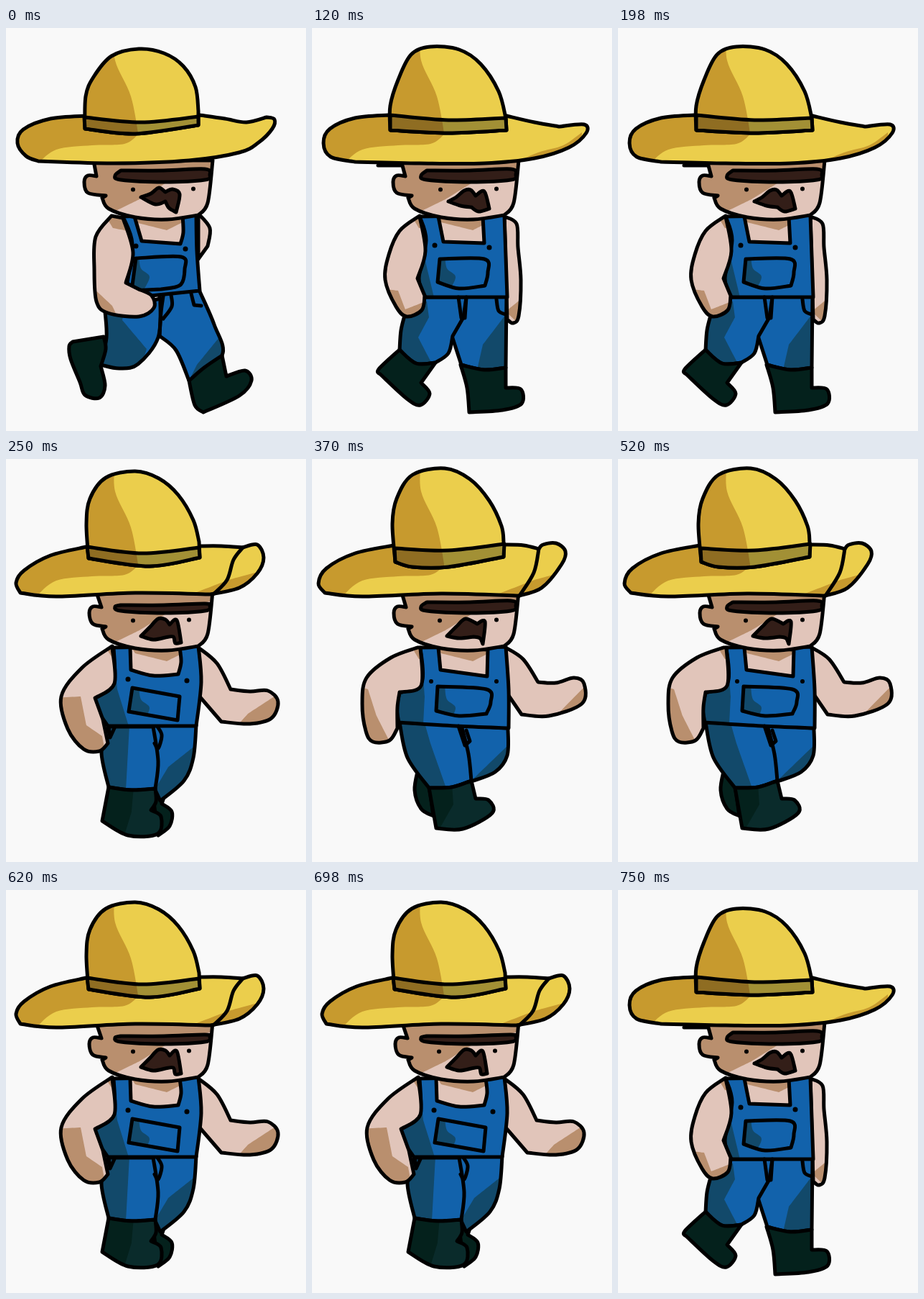
An HTML page with a canvas that plays this animation: 418x560 px, repeating every 0.87 s.

```html
<!DOCTYPE html>
<html lang="en">
<meta charset="utf-8">
<title>Walking farmer</title>
<style>
html, body { margin: 0; height: 100%; overflow: hidden; background: #f9f9f9 }
canvas { display: block }
</style>
<canvas width="418" height="560"></canvas>
<script>
const ctx = document.querySelector('canvas').getContext('2d');

// Smooth curve through the points; a slash makes the point before it a corner.
function trace(d) {
  const path = new Path2D();
  let last;
  for (const run of d.split('/')) {
    const n = run.trim().split(/\s+/).map(Number);
    const pts = last ? [last] : [];
    for (let i = 0; i < n.length; i += 2) pts.push([n[i], n[i + 1]]);
    if (!last) path.moveTo(...pts[0]);
    for (let i = 1; i < pts.length; i++) {
      const a = pts[i - 1], b = pts[i];
      const before = pts[i - 2] || a, after = pts[i + 1] || b;
      path.bezierCurveTo(
        a[0] + (b[0] - before[0]) / 6, a[1] + (b[1] - before[1]) / 6,
        b[0] - (after[0] - a[0]) / 6, b[1] - (after[1] - a[1]) / 6, ...b);
    }
    last = pts[pts.length - 1];
  }
  return path;
}

function line(d) {
  ctx.stroke(trace(d));
}

const material = (base, dark) => (d, ...shades) => {
  const path = trace(d);
  path.closePath();
  ctx.fillStyle = base;
  ctx.fill(path);
  ctx.save();
  ctx.clip(path);
  ctx.fillStyle = dark;
  for (const s of shades) ctx.fill(trace(s));
  ctx.restore();
  ctx.stroke(path);
};

const skin = material('#e1c5ba', '#b98f6e');
const denim = material('#1262ab', '#12496a');
const boot = material('#04211c', '#0a2b2b');
const hair = material('#331e18');
const straw = material('#ebce4c', '#c79a2e');
const ribbon = material('#a29035', '#8f6d22');

function dots(r, ...centres) {
  ctx.fillStyle = '#000';
  for (const [x, y] of centres) {
    ctx.beginPath();
    ctx.arc(x, y, r, 0, 7);
    ctx.fill();
  }
}

function neck(d) {
  skin(d, '170 255 / 246 255 / 246 270 / 224 281 / 180 270');
}

function pocket(d) {
  denim(d, '165 315 / 185 315 / 188 334 200 346 190 367 / 165 367');
}

function arm(d, shade) {
  skin(d, shade, '138 260 / 149 278 / 170 282 / 164 258');
}

function face(ear, browTop, leftEye, rightEye, moustache) {
  skin(`${124 + ear / 2} 184 / ${130 + ear} 206 / ${118 + ear} 205 ${113 + ear} 214 ${118 + ear} 229
    139 233 / 134 236 / 143 251 180 263 225 266 268 260 / 281 243 288 184`,
    '90 180 / 290 180 / 290 196 / 225 214 / 186 238 / 147 257 / 90 260');
  hair(`160 ${browTop} 220 ${browTop} 277 ${browTop - 2} 284 204 277 211
    220 214 160 211 152 205 160 ${browTop}`);
  hair(moustache);
  dots(3, [leftEye, 224.5], [rightEye, 223.5]);
}

function hat(brim, dome, bandTop, bottom, rimShade) {
  const domeShade = '152 5 152 45 174 95 185 152 / 90 152 / 90 5';
  straw(brim, '184 120 / 184 148 / 165 161 120 163 70 169 42 191 / 0 191 / 0 110', rimShade);
  straw(dome + '/' + bottom, domeShade);
  ribbon(bandTop + '/' + bottom, domeShade);
}

const wideRim = '275 190 / 315 173 350 163 376 145 / 376 195';
const foldedRim = '245 193 / 310 168 / 358 155 / 358 195';

function stride() {
  skin('268 258 284 278 281 303 / 268 321');
  denim('214 428 237 448 255 490 / 301 455 290 412 269 364 / 214 370',
    '297 430 / 266 468 / 250 500 / 310 460');
  denim('138 394 / 140 430 132 468 / 158 473 184 467 212 430 215 376',
    '120 390 / 165 390 / 162 406 / 196 446 / 185 480 / 120 480');
  boot('93 436 / 136 429 / 139 446 132 470 / 138 497 130 514 110 510 103 492 90 460 88 442 93 436');
  boot('255 490 / 276 472 301 455 / 307 484 / 333 476 342 490 325 511 275 534 / 263 524 255 490');
  denim('163 262 176 300 168 360 / 202 372 / 270 365 / 266 310 265 258');
  neck('179 262 189 296 / 243 300 / 247 284 246 260');
  pocket('181 320 / 244 318 249 335 243 357 216 363 / 175 365');
  dots(3.5, [181, 303], [250, 307]);
  line('219 373 216 395 214 426');
  line('230 371 231 387 219 404');
  line('258 369 / 262 385 / 272 386');
  arm('147 261 125 290 123 335 126 380 142 396 185 401 206 389 203 372 185 363 / 167 354 / 177 312 163 264',
    '120 360 / 148 386 / 157 405 / 118 405');
  face(-4, 198, 177, 261,
    '188 235 / 202 230 213 222 222 228 / 232 224 242 231 237 256 / 227 250 222 241 / 208 245 188 235');
  hat('113 122 62 126 24 141 16 160 28 178 45 185 / 150 188 255 184 325 173 352 159 371 140 374 127 363 124 / 335 131 305 126 270 121',
    '110 140 111 95 122 68 147 39 185 29 220 35 247 53 264 82 268 115',
    '109 124 188 131 268 123', '268 135 / 180 147 110 140', wideRim);
}

function step() {
  skin('268 262 285 272 287 305 291 350 288 400 280 410 272 405', '270 394 / 292 376 / 292 415');
  denim('195 428 208 468 / 240 475 270 472 / 271 372 / 200 372',
    '273 394 / 238 440 / 229 480 / 275 480');
  denim('130 396 124 420 122 448 / 145 466 172 465 / 190 452 196 428 / 211 402 / 215 374 / 158 374',
    '115 380 / 160 380 / 163 402 / 148 430 / 170 472 / 115 475');
  boot('122 447 / 145 466 172 465 / 152 493 / 164 508 151 524 132 515 95 481 / 93 474 122 447');
  boot('207 468 / 240 475 270 472 / 270 500 / 291 502 292 522 265 531 219 534 / 216 500 207 468');
  denim('150 262 159 295 149 348 158 374 / 210 374 272 374 / 268 260',
    '140 320 / 157 320 / 170 374 / 140 374');
  neck('176 262 183 297 / 240 299 / 238 262');
  pocket('178 321 / 240 321 245 340 241 358 / 205 362 175 353');
  dots(3.5, [171, 302], [247, 305]);
  line('204 374 208 403 / 213 403 / 215 374');
  line('257 377 260 393 270 398');
  arm('150 261 122 282 107 315 102 350 117 387 132 401 153 392 157 372 / 147 348 / 158 310 150 262',
    '95 362 / 120 365 / 130 391 / 158 380 / 150 410 / 95 410');
  line('92 191 / 128 191');
  face(0, 198, 179, 257,
    '190 241 / 201 235 212 226 221 225 228 233 / 240 227 247 251 / 232 255 222 249 / 207 247 190 241');
  hat('106 121 60 125 25 140 16 160 26 179 60 186 / 150 188 240 188 310 181 358 166 382 146 379 134 345 137 / 310 131 271 122',
    '109 142 109 108 120 72 138 37 165 26 205 30 235 50 260 88 270 125',
    '109 121 190 128 270 125', '271 142 / 190 146 109 142', wideRim);
}

function passing() {
  skin('268 262 294 284 313 320 / 340 323 365 322 379 337 370 360 340 368 300 365 / 268 328',
    '321 372 / 337 354 / 380 326 / 390 375');
  boot('204 462 220 465 217 479 / 231 490 228 510 212 523');
  denim('205 370 / 265 370 / 261 415 248 447 215 475 / 207 458',
    '264 398 / 226 428 / 207 460 / 215 480 / 260 445');
  denim('142 372 / 133 408 143 456 / 175 460 208 458 / 212 420 205 372',
    '125 370 / 172 370 / 167 462 / 125 462');
  boot('143 456 / 175 460 208 458 / 209 476 202 488 / 216 497 211 521 170 523 134 503 / 143 456',
    '178 455 / 175 490 / 163 530 / 220 530 / 220 455');
  denim('150 262 150 312 125 332 / 124 344 142 371 / 200 371 265 371 / 272 310 268 260',
    '110 260 / 150 260 / 155 320 / 172 374 / 110 374');
  neck('173 262 174 293 / 205 301 240 299 / 244 282 242 262');
  pocket('176 318 / 242 330 / 239 363 / 171 351');
  dots(3.5, [170, 306], [252, 308]);
  line('211 372 217 384 212 402 207 395');
  line('143 372 / 145 387 / 151 374');
  arm('148 260 106 290 77 330 86 375 108 403 130 406 142 395 / 135 362 / 124 332 / 151 312 148 262',
    '65 332 / 104 330 / 112 370 / 134 385 / 139 412 / 80 412');
  face(3, 203, 177, 255,
    '188 246 / 200 234 212 222 222 223 228 230 / 238 224 244 255 / 236 256 233 247 222 248 / 205 251 188 246');
  hat('112 122 62 134 25 155 14 172 20 186 / 70 191 180 186 285 188 / 325 179 350 159 359 137 350 119 330 123 / 300 121 269 121',
    '115 138 112 90 117 55 139 26 180 17 213 27 240 50 261 85 269 115',
    '113 122 190 131 269 123', '270 137 / 200 149 115 138', foldedRim);
  line('330 123 317 140 308 168 290 187');
}

function reach() {
  skin('268 261 294 278 315 310 / 340 311 365 304 379 312 376 340 330 357 292 355 / 268 320',
    '335 362 / 382 314 / 390 360');
  boot('148 430 143 460 152 486 169 496 / 163 453');
  denim('205 370 / 273 374 / 272 412 255 435 222 448', '276 395 / 222 447 / 270 455');
  denim('122 366 133 415 163 457 / 195 456 222 447 / 218 410 208 370',
    '110 360 / 155 360 / 165 395 / 188 460 / 110 460');
  boot('163 457 / 195 456 222 447 / 228 472 / 246 474 251 492 210 514 173 513 / 168 485 163 457',
    '195 452 / 197 480 / 177 515 / 260 515 / 260 452');
  denim('151 262 153 310 122 325 / 118 345 121 366 / 200 371 274 374 / 274 320 270 261',
    '110 260 / 152 260 / 157 330 / 155 370 / 110 370');
  neck('176 262 179 293 / 244 302 / 245 265');
  pocket('175 316 / 243 320 249 338 243 354 / 205 357 173 350');
  dots(3, [166, 309], [257, 309]);
  line('204 371 / 213 398 / 220 392 / 215 377');
  arm('147 262 110 276 76 304 70 340 75 378 85 393 108 391 119 374 / 119 345 122 324 / 152 315 151 262',
    '60 315 / 78 320 / 90 357 / 111 398 / 60 398');
  face(1, 199, 178, 257,
    '188 246 / 202 232 214 222 230 229 / 241 226 238 257 / 234 249 225 247 / 205 249 188 246');
  hat('114 120 60 131 20 152 9 173 18 186 / 70 191 180 187 288 190 / 320 179 348 146 353 128 340 117 322 119 316 125 / 295 120 267 119',
    '116 143 112 90 118 55 140 22 185 13 220 28 247 58 264 93 267 115',
    '115 124 190 127 268 118', '267 136 / 190 150 140 150 116 143', foldedRim);
  line('316 125 309 158 289 190');
}

const cycle = [
  [stride, 120], [step, 250], [passing, 370],
  [reach, 620], [passing, 750], [step, 870]
];

ctx.lineCap = ctx.lineJoin = 'round';
ctx.strokeStyle = '#000';
ctx.lineWidth = 5;
const start = performance.now();

function frame(now) {
  const t = Math.max(0, now - start) % 870;
  const [pose] = cycle.find(([, end]) => t < end);
  ctx.fillStyle = '#f9f9f9';
  ctx.fillRect(0, 0, 418, 560);
  pose();
  requestAnimationFrame(frame);
}
frame(start);
</script>
</html>
```
